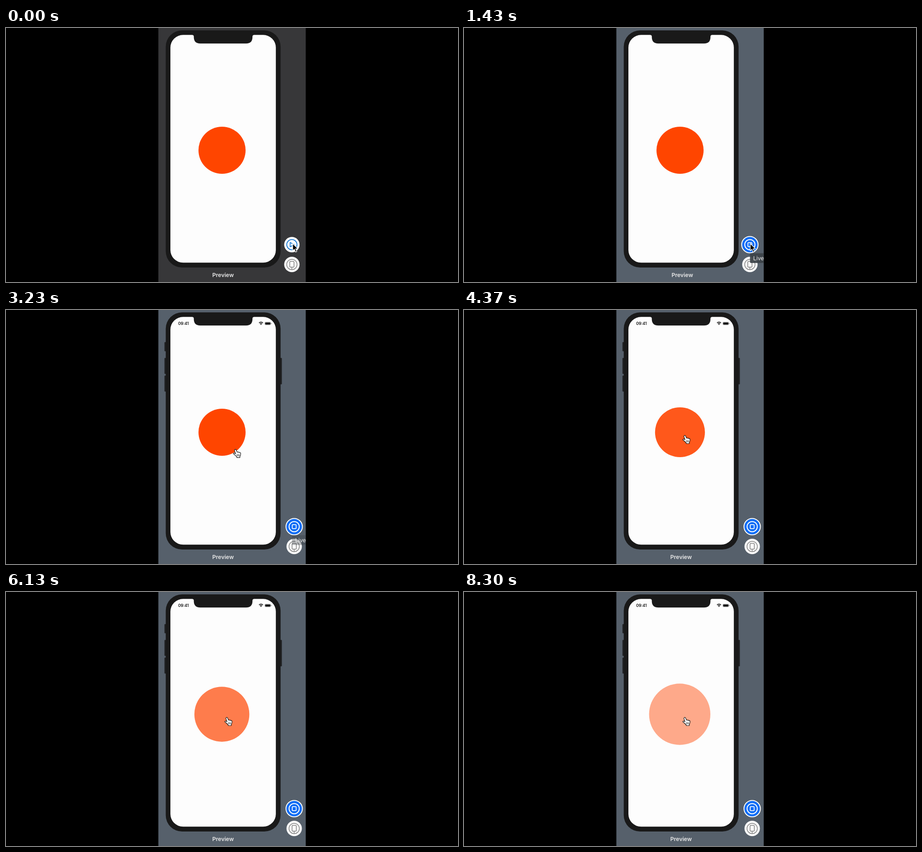
An HTML page for the animation above (8330 ms loop, 998 px wide and 561 px high).

```html
<!DOCTYPE html>
<html lang="en">
<head>
<meta charset="utf-8">
<title>Preview</title>
<style>
  html, body { margin: 0; width: 100%; height: 100%; overflow: hidden; background: #000; }
  svg { display: block; width: 100vw; height: 100vh; }
  text { font-family: Inter, Roboto, sans-serif; }
</style>
</head>
<body>
<svg viewBox="0 0 998 561">
  <defs>
    <clipPath id="panelClip"><rect x="336.4" width="325.4" height="561"/></clipPath>
  </defs>
  <g clip-path="url(#panelClip)">
    <rect id="panel" x="336" width="326" height="561"/>

    <g id="sideKeys" fill="#202123" stroke="#2f3338" stroke-width=".6">
      <rect x="350" y="71" width="5" height="20" rx="1"/>
      <rect x="350" y="106" width="5" height="35" rx="1"/>
      <rect x="350" y="145" width="5" height="35" rx="1"/>
      <rect x="604" y="106" width="5" height="58" rx="1"/>
    </g>

    <rect x="352.7" y="5.2" width="253.6" height="523.8" rx="36" fill="#191919"/>
    <rect x="363" y="15.3" width="232.8" height="503" rx="28" fill="#fdfdfd"/>
    <path d="M411 15Q414.7 15.3 414.7 19.3V20Q414.7 34.2 429 34.2H530Q544.2 34.2 544.2 20V19.3Q544.2 15.3 548 15Z" fill="#191919"/>

    <g id="status" fill="#111">
      <text x="380" y="33" font-size="8.8" font-weight="600">09:41</text>
      <path d="M558.6 28.4Q563 24.7 567.4 28.4M560.4 30.3Q563 28.1 565.6 30.3" fill="none" stroke="#111" stroke-width="1.5"/>
      <path d="M561.4 31.5Q563 30.2 564.6 31.5L563 33.2Z"/>
      <rect x="571.5" y="26.6" width="13" height="6.4" rx="1.8" fill="none" stroke="#777" stroke-width=".6"/>
      <rect x="572.3" y="27.4" width="11.4" height="4.8" rx="1.1"/>
      <rect x="585.2" y="28.7" width="1" height="2.2" rx=".5" fill="#777"/>
    </g>

    <circle id="mark" r="52" fill="#ff4500"/>

    <text id="label" y="549.8" text-anchor="middle" font-size="12.3" font-weight="600" fill="#e8e8e8">Preview</text>

    <g id="controls">
      <g id="play" fill="none" stroke="#1677d2" stroke-width="1.8">
        <circle cy="478.5" r="17" fill="#fff" stroke="none"/>
        <circle cy="478.5" r="11.3"/>
        <path d="M-3.8 473.8V483.2L5.6 478.5Z" stroke-linejoin="round"/>
      </g>
      <g id="stop" fill="none" stroke="#fff" stroke-width="2">
        <circle cy="478.5" r="18.1" fill="#0a6cf5"/>
        <circle cy="478.5" r="11.3"/>
        <rect x="-4.3" y="474.2" width="8.6" height="8.6" rx="1" stroke-width="1.8"/>
      </g>
      <g fill="none" stroke="#808080" stroke-width="1.5">
        <circle cy="522.3" r="17" fill="#fafafa" stroke="none"/>
        <circle cy="522.3" r="11.4"/>
        <rect x="-4.7" y="515.6" width="9.4" height="12.6" rx="1.5"/>
        <path d="M0 528.2V533.7"/>
      </g>
    </g>

    <g id="tip">
      <rect id="tipBack" x="631.5" y="497.5" width="45" height="21.5" rx="2" fill="#3d4349"/>
      <text x="638.5" y="513" font-size="12.3" fill="#f0f0f0">Live</text>
    </g>

    <path id="arrow" d="M0 0V16.2L3.7 12.7L6.3 18.8L9.1 17.6L6.5 11.6H11.5Z" fill="#000" stroke="#fff" stroke-width="1.3" stroke-linejoin="round"/>
    <g id="pointer" stroke="#111" stroke-width="1.2" stroke-linejoin="round" stroke-linecap="round">
      <path fill="#fff" d="M.2 .6C1.4 -.6 2.8 0 3.3 1.3L5.2 6C6.2 5.1 7.5 5.5 7.9 6.5C9 5.7 10.2 6.1 10.6 7.2C11.8 6.6 12.9 7.2 13.1 8.5C13.4 11.8 12.8 13.4 11.5 15.2V18H4.6V16.5C2.7 14.8 .4 11.7 -2.6 9.9C-3.2 8.1 -1.2 7.5 .8 8.8L2 9.6L-.3 3Q-.6 1.4 .2 .6Z"/>
      <path fill="none" stroke-width=".9" d="M5 11V14.7M7.4 11V14.7M9.8 11V14.7"/>
    </g>
  </g>
</svg>
<script>
const LOOP = 8330;
const $ = id => document.getElementById(id);
const clamp = v => Math.max(0, Math.min(1, v));
const ramp = (t, from, to) => clamp((t - from) / (to - from));
const mix = (a, b, p) => a + (b - a) * p;
const easeInOut = p => p < .5 ? 4 * p ** 3 : 1 - 4 * (1 - p) ** 3;

const DARK = [55, 55, 57], LIVE = [86, 96, 107];
const HOLDS = [[2330, 2700], [3530, 3800], [4830, 5370]];

const move = (id, x, y, scale = 1) =>
  $(id).setAttribute('transform', `translate(${x} ${y}) scale(${scale})`);
const fade = (id, value) => $(id).setAttribute('opacity', value);

function heldTime(t) {
  const hold = HOLDS.find(([from, to]) => t > from && t < to);
  return hold ? hold[0] : t;
}

function draw(time) {
  const t = heldTime(time);

  const tone = ramp(t, 400, 800);
  $('panel').setAttribute('fill', `rgb(${DARK.map((c, i) => mix(c, LIVE[i], tone))})`);

  const live = t >= 450;
  const ready = t >= 1900;
  fade('play', live ? 0 : 1);
  fade('stop', live ? 1 : 0);
  fade('sideKeys', ready ? 1 : 0);
  fade('status', t >= 2700 ? 1 : 0);
  move('controls', ready ? 636.3 : 631.2, 0);
  $('label').setAttribute('x', live && !ready ? 482 : 479.3);

  const tipIn = ramp(t, 1180, 1300);
  fade('tip', tipIn * (1 - ramp(t, 3230, 3530)));
  fade('tipBack', mix(.93, .35, ramp(t, 2950, 3230)));

  // The tapped mark grows and fades at a steady rate.
  const age = Math.max(0, t - 3420);
  move('mark', 477 - age * .00014, 270, 1 + age * .0000617);
  fade('mark', 1 - age * .000112);

  const glide = easeInOut(ramp(t, 2700, 3480));
  const startX = mix(633, 632, ramp(t, 30, 800));
  const x = mix(startX, 486, glide);
  const y = mix(476, 277, glide) + 44 * glide * (1 - glide);
  const over = Math.hypot(x - 477, y - 270) < 58;
  move('arrow', x, y);
  move('pointer', x, y);
  fade('arrow', over ? 0 : 1);
  fade('pointer', over ? 1 : 0);
}

function tick() {
  draw(performance.now() % LOOP);
  requestAnimationFrame(tick);
}
tick();
</script>
</body>
</html>
```
